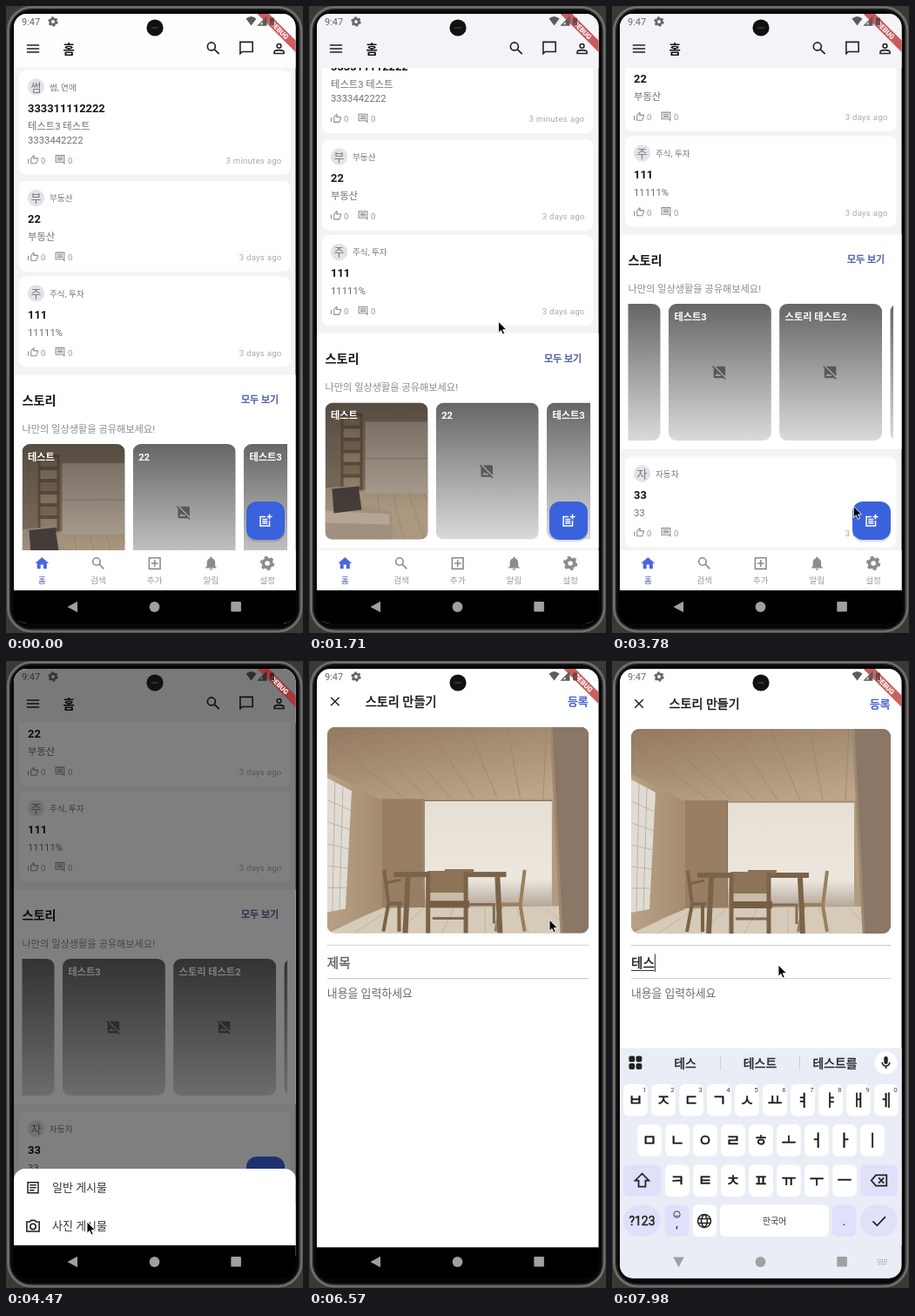
These frames come from a looping animation (341 by 720 pixels, 8 s). An HTML page:

```html
<!DOCTYPE html>
<html lang="ko">
<head>
<meta charset="utf-8">
<style>
html,body{margin:0;width:100%;height:100%;overflow:hidden;background:#3a3a34}
svg{display:block;width:341px;height:720px}
text{font-family:Roboto,"Noto Sans CJK KR","Noto Sans CJK",sans-serif;white-space:pre;stroke-width:0}
.med{stroke-width:.45px}
</style>
</head>
<body>
<svg id="stage" viewBox="0 0 341 720" xmlns="http://www.w3.org/2000/svg"></svg>
<script>
// Icons on a 24 grid: plain strings are filled, "~" strings are stroked.
const ICONS = {
  menu: '~M3 7H21M3 12H21M3 17H21',
  search: '~M14.8 9.5a5.4 5.4 0 1 1-10.8 0a5.4 5.4 0 1 1 10.8 0M13.6 13.6L20 20',
  chat: '~M3 3H21V17H6L3 19.8Z',
  person: '~M15 8a3 3 0 1 1-6 0a3 3 0 1 1 6 0M5 19V17C5 15 9 14 12 14S19 15 19 17V19Z',
  home: 'M10 20v-6h4v6h5v-8h3L12 3 2 12h3v8z',
  add: '~M4 4H20V20H4ZM12 7V17M7 12H17',
  bell: 'M12 22c1.1 0 2-.9 2-2h-4c0 1.1.9 2 2 2zm6-6v-5c0-3.1-1.6-5.6-4.5-6.3V4a1.5 1.5 0 0 0-3 0v.7C7.6 5.4 6 7.9 6 11v5l-2 2v1h16v-1z',
  like: '~M2 10V20M8 20V9L13.5 3.5L14.5 5L13.3 9H22V12L18.6 20Z',
  comment: '~M3 3H21V20L18.5 17H3ZM6 7H18M6 10H18M6 13H18',
  noImage: 'M21.9 21.9L2.1 2.1.7 3.5 3 5.8V19c0 1.1.9 2 2 2h13.2l2.3 2.3zM5 18l3.5-4.5 2.5 3 1.2-1.5 3 3zm16 .2L5.8 3H19c1.1 0 2 .9 2 2z',
  article: '~M4 4H20V20H4ZM7 8H17M7 12H17M7 16H14',
  camera: '~M3 6H7.5L9.3 4H14.7L16.5 6H21V20H3ZM16 13a4 4 0 1 1-8 0a4 4 0 1 1 8 0',
  post: '~M12 6H4V20H18V12M7 10H15M7 13H15M7 16H15M18 2V10M14 6H22',
  close: '~M5.7 5.7L18.3 18.3M18.3 5.7L5.7 18.3',
  addPhoto: '~M13 5H3V21H19V11M19 1V9M15 5H23M6 17.5L9 14L11 16.2L14 12.3L17 17.5Z',
  dots: 'M10 4h4v4h-4zM10 10h4v4h-4zM10 16h4v4h-4z',
  tag: '~M3 3H12L21 12L12 21L3 12ZM7 7h.1',
  history: '~M4 12a8 8 0 1 1 2.5 5.8M1 10L4 13L7 10M12 7V12L16 14.5',
  list: '~M3 5H21V19H3ZM3 9.7H21M3 14.3H21M8 5V19',
  expand: '~M4 9V4H9M15 4H20V9M20 15V20H15M9 20H4V15M5 5L10 10M19 5L14 10M5 19L10 14M19 19L14 14',
  mic: '~M12 4V11M6 11a6 6 0 0 0 12 0M12 17V21',
  shift: '~M12 3L21 12H16.5V20H7.5V12H3Z',
  erase: '~M8 5H22V19H8L2 12ZM11.5 8.5L18.5 15.5M18.5 8.5L11.5 15.5',
  globe: '~M21 12a9 9 0 1 1-18 0a9 9 0 1 1 18 0M3.5 9H20.5M3.5 15H20.5M12 3C6.5 8 6.5 16 12 21C17.5 16 17.5 8 12 3',
  check: '~M4 12.5L9.5 18L20.5 6.5',
  smile: '~M20 12a8 8 0 1 1-16 0a8 8 0 1 1 16 0M8 14a4.5 4.5 0 0 0 8 0M9 9.5h.1M15 9.5h.1'
};
const icon = (name, x, y, size, color, w = 2) => {
  const s = size / 24, d = ICONS[name], line = d[0] === '~';
  const paint = line ? `fill="none" stroke="${color}" stroke-width="${w}"` : `fill="${color}"`;
  return `<path transform="translate(${x - size / 2} ${y - size / 2}) scale(${s})" d="${line ? d.slice(1) : d}" ${paint}/>`;
};
const gear = (x, y, r, c) => `<g fill="none" stroke="${c}"><circle cx="${x}" cy="${y}" r="${r * .58}" stroke-width="${r * .46}"/>
  <circle cx="${x}" cy="${y}" r="${r * .85}" stroke-width="${r * .34}" stroke-dasharray="${r * .45} ${r * .44}"/></g>`;
const rect = (x, y, w, h, fill, r = 0, more = '') =>
  `<rect x="${x}" y="${y}" width="${w}" height="${h}" rx="${r}" fill="${fill}" ${more}/>`;
const disc = (x, y, r, fill) => `<circle cx="${x}" cy="${y}" r="${r}" fill="${fill}"/>`;
const poly = (p, fill) => `<polygon points="${p}" fill="${fill}"/>`;
const line = (d, c, w = 1) => `<path d="${d}" fill="none" stroke="${c}" stroke-width="${w}"/>`;
// y is the visual middle of the text
const text = (x, y, size, str, fill, more = '') =>
  `<text x="${x}" y="${y + size * .365}" font-size="${size}" fill="${fill}" stroke="${fill}" ${more}>${str}</text>`;
const BOLD = 'font-weight="700"', MED = 'class="med"', MID = 'text-anchor="middle"';
const group = (id, body, more = '') => `<g id="${id}" ${more}>${body}</g>`;

const defs = `<defs>
<clipPath id="screen"><rect x="9" y="9" width="323.5" height="700" rx="15"/></clipPath>
<clipPath id="row"><rect x="18.5" y="495" width="304.5" height="170"/></clipPath>
<clipPath id="card"><rect width="118" height="157" rx="9"/></clipPath>
<clipPath id="round"><rect x="22" y="78" width="298" height="235" rx="9"/></clipPath>
<linearGradient id="fade" x2="0" y2="1"><stop offset="0" stop-color="#666"/><stop offset="1" stop-color="#dadada"/></linearGradient>
<linearGradient id="shade" x2="0" y2="1"><stop offset="0" stop-color="#2c2824" stop-opacity=".5"/><stop offset=".8" stop-color="#2c2824" stop-opacity="0"/></linearGradient>
<linearGradient id="ceil" x2=".7" y2="1"><stop offset="0" stop-color="#92795f"/><stop offset="1" stop-color="#bda68a"/></linearGradient>
<linearGradient id="pane" x2="0" y2="1"><stop offset="0" stop-color="#e6dfd4"/><stop offset=".75" stop-color="#ece6dd"/><stop offset="1" stop-color="#b5a698"/></linearGradient>
<linearGradient id="side"><stop offset="0" stop-color="#b8a287"/><stop offset="1" stop-color="#a58c70"/></linearGradient>
<symbol id="dining" viewBox="0 0 298 235" preserveAspectRatio="xMidYMid slice">${dining()}</symbol>
<symbol id="lounge" viewBox="0 0 118 157" preserveAspectRatio="xMidYMid slice">${lounge('#80705f', '#b0a395', '#ab9880')}</symbol>
<symbol id="sunny" viewBox="0 0 118 118" preserveAspectRatio="xMidYMid slice">${lounge('#b59c80', '#efe9de', '#c4ae92')}</symbol>
<symbol id="hall" viewBox="0 0 118 118" preserveAspectRatio="xMidYMid slice">${hall()}</symbol>
</defs>`;

function dining() {
  const wood = '#7b6349';
  let s = rect(0, 0, 298, 235, '#b39b7f') + poly('0,0 298,0 298,82 62,83 0,52', 'url(#ceil)');
  for (let i = 0; i < 7; i++) s += line(`M${i * 45 - 20} 0L${90 + i * 26} 82`, '#957d63', .6);
  s += rect(62, 82, 49, 125, '#977e64') + rect(110, 84, 146, 120, 'url(#pane)') + line('M110.5 204V84H256', '#85705a', 1.2);
  s += poly('62,206 270,204 298,235 0,235', '#d6cab9') + poly('0,52 62,83 62,207 0,231', 'url(#side)');
  for (let i = 0; i < 6; i++) s += line(`M${75 + i * 35} 206L${30 + i * 50} 235`, '#bba994', .7);
  s += poly('0,58 28,73 21,207 0,211', '#e0dcd4');
  for (let i = 1; i < 6; i++) s += line(`M0 ${58 + i * 25}L${28 - i} ${73 + i * 22}`, '#b4aa9b', .8);
  s += line('M9 63L6 210M18 68L14 209', '#b4aa9b', .8) + poly('255,0 298,0 298,235 267,235', '#8a7765');
  s += line('M255 0L267 235', '#9d8873', 3);
  s += line('M65 163L70 201L64 233M70 201H86M82 200V233', wood, 4) + line('M66 178L84 174', wood, 3);
  s += line('M225 163L220 203L225 233M222 202H198L192 233', '#99805f', 4);
  s += rect(76, 165, 128, 6, wood) + line('M92 171L89 235M194 171L197 235', wood, 6);
  s += rect(134, 162, 33, 4, '#8b7257') + rect(113, 164, 47, 25, '#8d7459', 3) + rect(117, 189, 40, 9, '#c9bba7');
  s += line('M115 165V235M158 165V235', wood, 5) + rect(116, 198, 46, 8, '#745e46');
  return s + line('M120 218H156M162 202H190V224', '#846b50', 3);
}
function lounge(wall, glass, floor) {
  let s = rect(0, 0, 118, 157, wall) + poly('0,112 46,100 118,100 118,157 0,157', floor) + rect(46, 22, 72, 82, glass);
  s += line('M46 64H118', '#91847a', 1) + rect(18, 12, 25, 88, '#66513d');
  for (let i = 0; i < 6; i++) s += rect(21, 16 + i * 14, 19, 10, i % 2 ? '#9a8872' : '#84715c');
  for (let i = 0; i < 4; i++) s += line(`M${60 + i * 18} 104L${66 + i * 24} 157`, '#93816c', .7);
  s += poly('0,98 36,95 44,118 76,125 78,157 0,157', '#a19080') + poly('0,124 74,128 74,140 0,138', '#b6a592');
  return s + poly('8,99 38,96 42,123 10,127', '#453d38');
}
function hall() {
  return rect(0, 0, 118, 118, '#9c8468') + poly('0,0 118,0 84,34 30,34', '#8b745b') + rect(30, 34, 56, 42, '#e9e1d4') +
    poly('0,118 30,76 86,76 118,118', '#baa388') + rect(4, 30, 18, 56, '#6d5844') + rect(92, 40, 20, 38, '#7d6751') +
    poly('0,92 34,88 40,106 0,114', '#71604f') + rect(50, 70, 34, 12, '#8b7660', 3);
}

function post(top, letter, topic, title, lines, ago) {
  const y = top + 71 + lines.length * 16;
  return rect(15, top, 311.5, y - top + 17, '#fff', 8) + disc(34.5, top + 19.5, 9.7, '#e2e3e9') +
    text(34.5, top + 19.5, 13, letter, '#777', MID) + text(50, top + 19.5, 9.6, topic, '#777') +
    text(25, top + 43.5, 12.9, title, '#161616', BOLD) +
    lines.map((l, i) => text(25, top + 64 + i * 16, 11.3, l, '#707070')).join('') +
    icon('like', 31, y, 13, '#8a8a8a', 1.9) + text(40, y + .5, 9.6, '0', '#999') +
    icon('comment', 62, y, 13, '#8a8a8a', 1.9) + text(71, y + .5, 9.6, '0', '#999') +
    text(316.5, y + .5, 9.6, ago, '#aaa', 'text-anchor="end" letter-spacing=".25"');
}
const stories = ['테스트', '22', '테스트3', '스토리 테스트2', '스토리 테스트'].map((name, i) =>
  `<g transform="translate(${18.5 + i * 127.2} 503)" clip-path="url(#card)">` +
  (i ? rect(0, 0, 118, 157, 'url(#fade)') + icon('noImage', 58.5, 78.5, 18, '#585858')
     : '<use href="#lounge" width="118" height="157"/>' + rect(0, 0, 118, 157, 'url(#shade)')) +
  text(6.5, 14.5, 11.2, name, '#fff', BOLD) + '</g>').join('');

const feed = post(73.5, '썸', '썸, 연애', '333311112222', ['테스트3 테스트', '3333442222'], '3 minutes ago') +
  post(201, '부', '부동산', '22', ['부동산'], '3 days ago') +
  post(310.5, '주', '주식, 투자', '111', ['11111%'], '3 days ago') +
  rect(9, 423.5, 324, 246.5, '#fff') + text(18.5, 452.7, 14.2, '스토리', '#1a1a1a', BOLD) +
  text(270, 452, 11, '모두 보기', '#4d5ca6', MED) + text(18.5, 485.7, 11.2, '나만의 일상생활을 공유해보세요!', '#8c8c8c') +
  `<g clip-path="url(#row)">${group('stories', stories)}</g>` +
  post(678.5, '자', '자동차', '33', ['33'], '3 days ago');

const tabs = [['home', '홈'], ['search', '검색'], ['add', '추가'], ['bell', '알림'], ['gear', '설정']].map(([ic, label], i) => {
  const x = 41.3 + i * 64.7, c = i ? '#8b8b8b' : '#4a68dc';
  return (ic === 'gear' ? gear(x, 640, 8, c) : icon(ic, x, 640, 19, c)) + text(x, 659, 9.6, label, i ? '#999' : '#4a5cae', MID);
}).join('');

const home = rect(9, 9, 324, 662, '#f3f3f4') + group('feed', feed) +
  rect(9, 9, 324, 62, '#fdfdfd', 0, 'id="bar"') + icon('menu', 31, 49, 19, '#222') + text(65.5, 49.5, 14.5, '홈', '#111', BOLD) +
  icon('search', 238, 48.5, 20, '#222') + icon('chat', 276, 48.5, 19, '#222') + icon('person', 313.5, 49, 19, '#222') +
  rect(9, 625, 324, 46, '#fff') + tabs +
  rect(276, 571.5, 44, 44, '#000', 12, 'opacity=".12"') + rect(276, 569, 44, 44, '#3a62dd', 12) + icon('post', 298, 591, 18, '#fff') +
  rect(9, 9, 324, 662, '#000', 0, 'id="scrim"') +
  group('sheet', rect(9, 583, 324, 110, '#fff', 13) + icon('article', 31, 604.7, 18, '#222') + text(53, 604.7, 13, '일반 게시물', '#333') +
    icon('camera', 31, 648.7, 19, '#222') + text(53, 648.7, 13, '사진 게시물', '#333'));

const editor = rect(9, 9, 324, 662, '#fff') + icon('close', 31, 49, 18, '#222') +
  text(65.5, 49, 14.1, '스토리 만들기', '#151515', MED) + text(296, 49, 12.8, '등록', '#3c53d2', MED) +
  group('empty', icon('addPhoto', 170.5, 182, 46, '#a3a3a3', 1.9) + text(170.5, 222, 12.7, '탭하여 사진 추가', '#999', MID)) +
  group('photo', '<use href="#dining" x="22" y="78" width="298" height="235"/>', 'clip-path="url(#round)"') +
  line('M22 326.5H320M22 364.5H320', '#cdcdcd', 1.2) + text(22, 346.5, 14.6, '제목', '#666', MED + ' id="hint"') +
  text(22, 347, 14.6, '', '#222', MED + ' id="typed"') + line('M0 0', '#333', 1).replace('<path', '<path id="caret"') +
  text(22, 381.5, 12.8, '내용을 입력하세요', '#6a6a6a');

const banner = poly('288.5,9 302,9 333,40 333,53.5', 'rgba(183,28,28,.7)') +
  text(0, 0, 8, 'DEBUG', '#fff', `${MID} font-weight="900" transform="translate(314.2 27.8) rotate(45)"`);

const chip = (x, w, ic, label) => rect(x, 86, w, 23, '#fff', 11, 'stroke="#d2d2d2"') +
  icon(ic, x + 15, 97.5, 17, '#444', 1.8) + text(x + 30, 97.5, 10.5, label, '#333');
const picker = rect(17, 25, 308.5, 666.5, '#fff') + icon('menu', 38, 62, 18, '#333') + text(71, 62, 14.7, '최근', '#222') +
  icon('search', 270.5, 62, 18, '#333') + icon('dots', 305, 62, 16, '#333') +
  chip(35.5, 89, 'tag', '대용량 파일') + chip(131, 69, 'history', '이번 주') +
  text(35.5, 133, 8.6, '다른 앱의 파일 탐색', '#222') + disc(94, 168, 9, '#e8a33a') + disc(247.5, 168, 9, '#4c83e0') +
  text(94, 193, 8.7, '화첩', '#222', MID) + text(247.5, 193, 8.7, 'Nubel', '#222', MID) +
  text(35.5, 226, 8.8, '최근 이미지', '#222') + icon('list', 288, 226, 15, '#333') +
  ['sunny', 'hall', 'dining'].map((id, i) => {
    const x = 35 + i * 92.4;
    return `<use href="#${id}" x="${x}" y="251" width="87" height="87"/>` + disc(x + 69, 269, 9, 'rgba(70,70,70,.75)') + icon('expand', x + 69, 269, 12, '#fff');
  }).join('');

const key = (x, y, w, label, fill = '#fff', r = 6) =>
  rect(x - w / 2, y, w, 36.5, fill, r) + text(x, y + 18, 18.5, label, '#1b1c20', `${MID} ${MED}`);
const rows = ['ㅂㅈㄷㄱㅅㅛㅕㅑㅐㅔ', 'ㅁㄴㅇㄹㅎㅗㅓㅏㅣ', 'ㅋㅌㅊㅍㅠㅜㅡ'];
const LILAC = '#e0e0fb';
const keyboard = rect(9, 444.5, 324, 270, '#e9eef6') +
  [[22.8, 457], [31, 457], [22.8, 465.5], [31, 465.5]].map(([x, y]) => rect(x - 3.4, y - 3.6, 6.8, 7, '#222', 2)).join('') +
  line('M124.5 453V470M215.5 453V470', '#ccd1d9') +
  [0, 1, 2].map(i => text(84 + i * 86, 461.5, 13.9, '', '#222', `${MID} ${MED} id="word${i}"`)).join('') +
  disc(314.5, 461.5, 13, '#fff') + icon('mic', 314.5, 461.5, 17, '#222', 2.4) + rect(312.3, 454, 4.4, 9, '#222', 2.2) +
  rows.map((row, r) => [...row].map((ch, i) => {
    const x = [27, 43, 75][r] + i * 32, y = 486 + r * 46.2;
    return key(x, y, 27.5, ch) + (r ? '' : text(x + 10.5, y + 6.5, 8, (i + 1) % 10, '#444', MID));
  }).join('')).join('') +
  rect(13, 578.4, 43, 36.5, LILAC, 6) + icon('shift', 34.5, 596.5, 21, '#222') +
  rect(285, 578.4, 43, 36.5, LILAC, 6) + icon('erase', 306.5, 596.5, 21, '#222') +
  rect(13, 624.6, 43, 36.5, LILAC, 18) + text(34.5, 643, 14, '?123', '#222', `${MID} ${MED}`) +
  key(74.5, 624.6, 27.5, '', LILAC) + icon('smile', 74.5, 635.5, 11, '#333') + text(74.5, 646, 15, ',', '#222', MID) +
  key(106.5, 624.6, 27.5, '') + icon('globe', 106, 643, 20, '#222', 1.8) + rect(124, 624.6, 125, 36.5, '#fff', 6) +
  text(186.5, 643, 10, '한국어', '#333', MID) + key(266.5, 624.6, 27.5, '', LILAC) + text(266.5, 643, 15, '.', '#222', MID) +
  rect(285, 624.6, 43, 36.5, LILAC, 18) + icon('check', 306.5, 643, 21, '#222') +
  line('M304.5 687.5H317M304.5 690H317M306.5 692.5H315', '#a9adb3', 1.3).replace('/>', ' stroke-dasharray="1.5 1"/>');

const status = text(18, 18, 11, '9:47', '#666') + gear(54, 18, 5.6, '#666') +
  `<path d="M275.5 14.5Q281.5 9.5 287.5 14.5L281.5 22.5Z" fill="#5c5c5c"/><path d="M290 22L298.8 13V22Z" fill="none" stroke="#5c5c5c" stroke-width="1.3"/><path d="M294.5 22V18L298.8 13.5V22Z" fill="#5c5c5c"/>` +
  rect(303, 13.5, 5, 9, 'rgba(80,60,60,.8)', 1);
const system = group('status', status) +
  group('back', poly('70.5,690 82,683.7 82,696.3', '#a0a0a0')) + disc(170.5, 690, 5.9, '#a0a0a0') + rect(258.3, 684, 11.6, 11.6, '#a0a0a0', 1);

const $ = id => document.getElementById(id);
$('stage').innerHTML = defs + rect(0, 0, 341, 720, '#3a3a34') +
  rect(2.5, 1.5, 336.5, 716.5, '#000', 27, 'stroke="#6c6c6c" stroke-width="3"') +
  rect(5, 4, 331.5, 711.5, '#060606', 24, 'stroke="#2e2e2e"') +
  `<g clip-path="url(#screen)">` + rect(9, 9, 324, 700, '#000') +
  group('app', group('home', home) + group('editor', editor) + banner + rect(0, 671, 341, 60, '#000')) +
  group('picker', picker) + group('keyboard', keyboard) + system + '</g>' +
  disc(171, 25, 9.6, '#111') + line('M167 25H175', '#3a3a3a', 1.5) +
  group('cursor', '<path d="M0 0V13.2L3 10.4L5 15L7.2 14L5.2 9.6H9.4Z" fill="#000" stroke="#fff" stroke-width=".9"/>');

// cursor tip: time, x, y
const PATH = [[450, 342, 560], [780, 262, 505], [1080, 262, 505], [1380, 230, 460], [1530, 222, 452], [1860, 214, 295],
  [2040, 214, 295], [2670, 258, 448], [2850, 260, 451], [3240, 62, 449], [3480, 62, 449], [3840, 294, 584], [4020, 294, 584],
  [4400, 93, 644], [4620, 93, 644], [5100, 76, 513], [5220, 133, 230], [5550, 133, 230], [5700, 154, 244], [5850, 154, 244],
  [6240, 276, 297], [6600, 276, 297], [7050, 160, 342], [7300, 160, 342], [7560, 191, 349], [8000, 191, 349]];
const clamp = v => Math.max(0, Math.min(1, v));
const out = (t, a, d) => 1 - (1 - clamp((t - a) / d)) ** 3;
const smooth = u => u * u * (3 - 2 * u);
const show = (id, on) => $(id).setAttribute('display', on ? 'inline' : 'none');
const move = (id, v) => $(id).setAttribute('transform', v);
const zoom = s => `translate(171 355) scale(${s}) translate(-171 -355)`;
const TYPING = [[7680, 'ㅌ'], [7770, '테'], [7860, '텟'], [7950, '테스']];
const CARET = { '': 22, 'ㅌ': 36, '테': 36, '텟': 36, '테스': 49.4 };

function draw(t) {
  const i = PATH.findIndex(p => p[0] > t);
  show('cursor', i > 0);
  if (i > 0) {
    const a = PATH[i - 1], b = PATH[i], u = smooth((t - a[0]) / (b[0] - a[0]));
    move('cursor', `translate(${a[1] + (b[1] - a[1]) * u} ${a[2] + (b[2] - a[2]) * u})`);
  }

  const scroll = smooth(clamp((t - 1560) / 420));
  move('feed', `translate(0 ${-161 * scroll})`);
  $('bar').setAttribute('fill', scroll > .05 ? '#f4f4f8' : '#fdfdfd');
  move('stories', `translate(${-208 * smooth(clamp((t - 2880) / 420))} 0)`);

  const sheet = out(t, 4020, 260) * (1 - out(t, 4620, 200));
  $('scrim').setAttribute('opacity', .5 * sheet);
  $('status').style.filter = sheet ? `brightness(${1 - .5 * sheet})` : '';
  move('sheet', `translate(0 ${112 * (1 - sheet)})`);
  show('sheet', sheet > 0);

  const push = out(t, 4680, 300);
  show('home', push < 1);
  show('editor', push > 0);
  $('editor').setAttribute('opacity', clamp(push * 1.4));
  move('editor', push < 1 ? zoom(.85 + .15 * push) : '');

  const open = out(t, 5690, 310), close = out(t, 6430, 310);
  move('app', zoom(1 + .05 * open * (1 - close)));
  const alpha = open * clamp(1 - (t - 6430) / 110);
  show('picker', alpha > 0);
  $('picker').setAttribute('opacity', alpha);
  move('picker', zoom((.85 + .15 * open - .08 * close) / .953));
  show('photo', t >= 6430);
  show('empty', t < 6430);

  const kb = out(t, 7290, 260);
  show('keyboard', kb > 0);
  move('keyboard', `translate(0 ${265 * (1 - kb)})`);
  move('back', kb > 0 ? 'rotate(-90 76.5 690)' : '');

  let word = '';
  for (const [at, s] of TYPING) if (t >= at) word = s;
  $('typed').textContent = word;
  show('hint', !word);
  const x = CARET[word];
  $('caret').setAttribute('d', t >= 7290 ? `M${x} 336.5V357` + (word ? `M22 355.5H${x - 1}` : '') : '');
  ['', '트', '트를'].forEach((tail, n) => {
    $('word' + n).textContent = word === '테스' ? word + tail : n === 1 ? word : '';
  });
}
const start = performance.now();
(function tick() {
  draw((performance.now() - start) % 8000);
  requestAnimationFrame(tick);
})();
</script>
</body>
</html>
```
